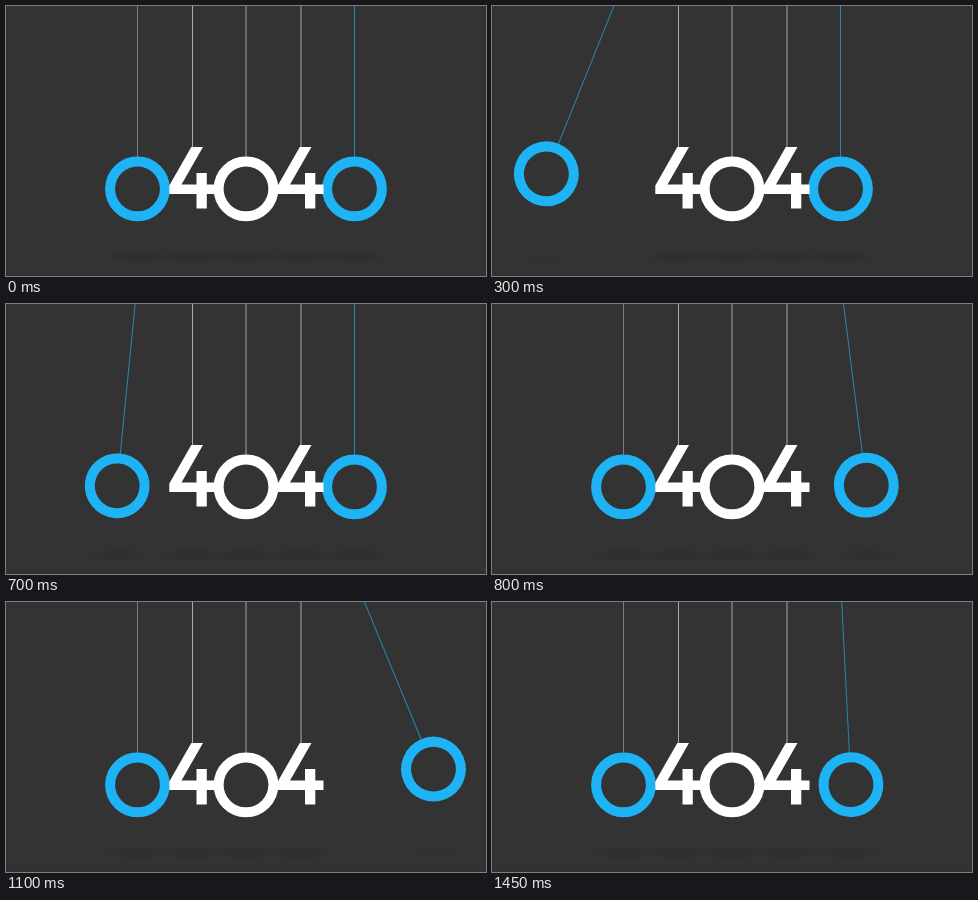
Recreate the animation shown at these times as an HTML page. Size 480 by 270 pixels, loop 1.5 s.

```html
<!DOCTYPE html>
<html lang="en">
<head>
<meta charset="utf-8">
<title>404 cradle</title>
<style>
html, body { margin: 0; width: 100%; height: 100%; overflow: hidden; background: #333; }
svg { display: block; width: 100vw; height: 100vh; }
.blue { stroke: #1eb3f5; }
.white { stroke: #fff; }
circle { fill: none; stroke-width: 10; }
</style>
</head>
<body>
<svg viewBox="0 0 480 270">
  <defs>
    <radialGradient id="soft">
      <stop offset="0" stop-color="#202020" stop-opacity=".3"/>
      <stop offset=".5" stop-color="#202020" stop-opacity=".2"/>
      <stop offset="1" stop-color="#202020" stop-opacity="0"/>
    </radialGradient>
    <path id="four" d="M185.3 141H197L175.5 178.5H190.5V167H200.8V178.5H209V188H200.8V202.5H190.5V188H163.3V179.5Z"/>
  </defs>
  <rect width="480" height="270" fill="#333"/>
  <rect y="267" width="480" height="3" fill="#342f30"/>
  <g id="shadows" fill="url(#soft)"></g>
  <path d="M186.5 0V142" stroke="#acacac"/>
  <path d="M240 0V151" stroke="#a4a4a4"/>
  <path d="M295 0V142" stroke="#acacac"/>
  <g id="left">
    <path d="M131.5 -24V151"/>
    <circle class="blue" cx="131.5" cy="182.8" r="27.4"/>
  </g>
  <g id="right">
    <path d="M348.5 -24V151" stroke="#2787b3"/>
    <circle class="blue" cx="348.5" cy="182.8" r="27.4"/>
  </g>
  <circle class="white" cx="240" cy="182.8" r="27.4"/>
  <g fill="#fff">
    <use href="#four"/>
    <use href="#four" x="108.5"/>
  </g>
</svg>
<script>
const LOOP = 1500, SWING = 22.5, PIVOT_Y = -24, LENGTH = 206.8;
const left = document.getElementById('left');
const right = document.getElementById('right');
const leftString = left.querySelector('path');

const shadows = [131.5, 186, 240, 294.5, 348.5].map(x => {
  const e = document.createElementNS('http://www.w3.org/2000/svg', 'ellipse');
  e.setAttribute('cx', x);
  e.setAttribute('cy', 251);
  e.setAttribute('rx', 34);
  e.setAttribute('ry', 7);
  document.getElementById('shadows').append(e);
  return e;
});

// Angle of a ball that leaves at start, turns at peak and lands at end
function swing(t, start, peak, end) {
  if (t <= start || t >= end) return 0;
  const v = t < peak ? (peak - t) / (peak - start) : (t - peak) / (end - peak);
  return SWING * (1 - Math.pow(v, 2.4));
}

function hang(ball, shadow, x, angle) {
  ball.setAttribute('transform', `rotate(${angle} ${x} ${PIVOT_Y})`);
  shadow.setAttribute('cx', x - LENGTH * Math.sin(angle * Math.PI / 180));
  shadow.setAttribute('opacity', 1 - 0.8 * Math.abs(angle) / SWING);
}

function draw(t) {
  const a = swing(t, 20, 380, 742);
  const b = swing(t, 744, 1130, 1470);
  hang(left, shadows[0], 131.5, a);
  hang(right, shadows[4], 348.5, -b);
  leftString.setAttribute('stroke', a > 0 ? '#2787b3' : '#7c7c7c');
}

const begin = performance.now();
function frame() {
  draw((performance.now() - begin) % LOOP);
  requestAnimationFrame(frame);
}
draw(0);
requestAnimationFrame(frame);
</script>
</body>
</html>
```
